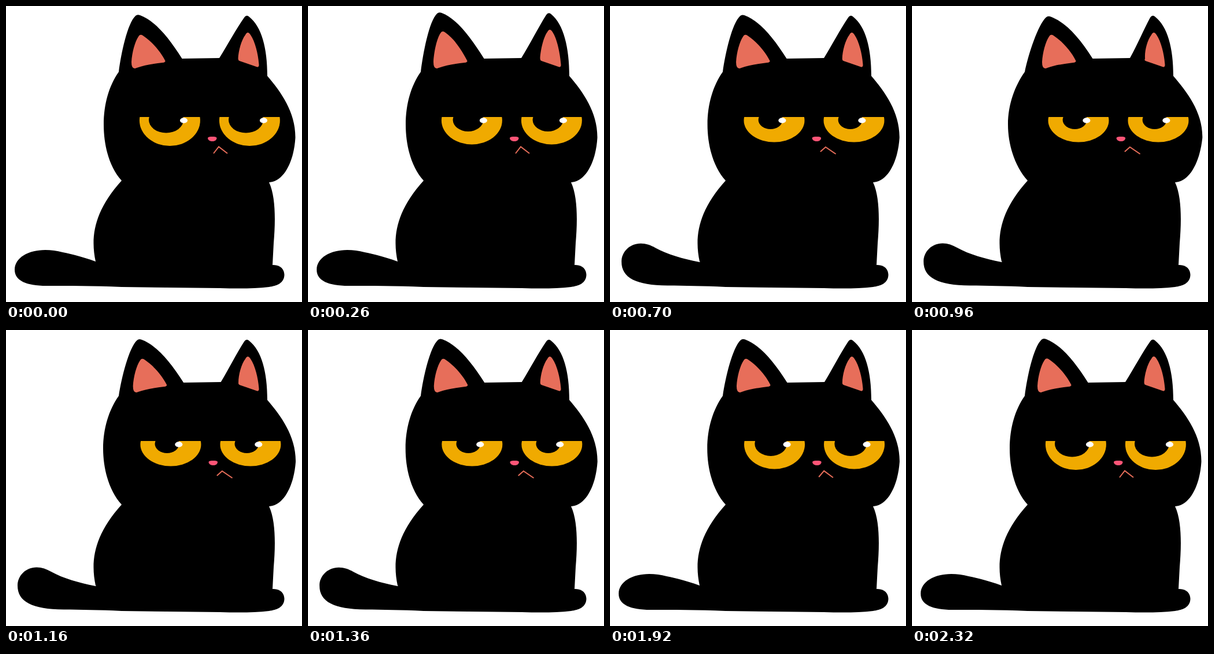
Recreate the animation shown at these times as an HTML page. Size 512 px wide and 512 px high, loop 2340 ms.

```html
<!DOCTYPE html>
<html>
<head>
<meta charset="utf-8">
<title>Grumpy cat</title>
<style>
html, body { margin: 0; width: 100%; height: 100%; overflow: hidden; background: #fff; }
svg { display: block; width: 100vw; height: 100vh; }
</style>
</head>
<body>
<svg viewBox="0 0 512 512">
  <clipPath id="lid"><rect y="192" width="512" height="100"/></clipPath>
  <path id="tail"/>
  <path id="cat"/>
  <path id="inner" fill="#e76e5a"/>
  <g id="face">
    <g clip-path="url(#lid)">
      <g id="eye">
        <ellipse id="iris" cx="283.4" cy="198" rx="52.5" fill="#f0aa00"/>
        <ellipse id="pupil" cx="277" cy="197"/>
        <ellipse id="glint" cy="198" rx="6.6" ry="4.7" fill="#fff"/>
      </g>
      <use href="#eye" x="138"/>
    </g>
    <path fill="#ff5577" d="M349 229C349 226 353 226 357 226S364.500 226 364.500 229C364 232 361 234 357 234S349.500 232 349 229Z"/>
    <path id="mouth" fill="none" stroke="#e76e5a" stroke-width="2"/>
  </g>
</svg>
<script>
const LOOP = 2340;
const $ = id => document.getElementById(id);
const set = (id, attrs) => { for (const k in attrs) $(id).setAttribute(k, attrs[k]); };
const mix = (a, b, k) => a + (b - a) * k;
const mixAll = (a, b, k) => a.map((v, i) => mix(v, b[i], k));

// Eased 0 to 1 between two times
const ease = (t, from, to) => {
  const k = Math.min(1, Math.max(0, (t - from) / (to - from)));
  return (1 - Math.cos(Math.PI * k)) / 2;
};
const hump = (t, from, to) => ease(t, from, (from + to) / 2) - ease(t, (from + to) / 2, to);

const tailDown = [155, 442, 130, 433, 115, 429.5, 98, 426, 88, 423.5, 78, 422, 68, 422,
  38, 422, 15, 436, 15, 456, 15, 475, 35, 484, 70, 484, 110, 484, 150, 484, 200, 486];
const tailUp = [155, 443, 125, 437, 100, 430, 78, 418, 70, 413.5, 62, 410.5, 53, 410.5,
  34, 410.5, 20, 425, 20, 442, 20, 470, 45, 483, 100, 483.5, 130, 484, 160, 484, 200, 486];
const mouthRest = [359, 255, 368, 243.5, 383, 255];
const mouthSkew = [363.3, 252, 372.3, 244, 390, 256];

function draw(t) {
  const lift = hump(t, 0, 340) + hump(t, 2000, 2340);
  const turn = ease(t, 620, 960) - ease(t, 960, 1290) + ease(t, 1290, 1640) - ease(t, 1690, 2035);
  const narrow = ease(t, 0, 600) - ease(t, 1640, 2060);
  const skew = ease(t, 300, 680) - ease(t, 1640, 2060);
  const wag = ease(t, 500, 720) - ease(t, 1340, 1560);

  const [x, y, ...curve] = mixAll(tailDown, tailUp, wag);
  set('tail', { d: `M${x} ${y}C${curve.join(' ')}L220 440Z` });

  const ex = 8 * turn - 1.5 * lift;   // left ear tip
  const ey = 2.5 * turn - 9 * lift;
  const nx = 8 * turn;                // ear notches
  const ry = -10 * lift;              // right ear tip
  const side = 3 * turn;
  set('cat', { d: `M195 114C${199 + nx / 3} 82 ${210 + ex} ${30 + ey} ${224 + ex} ${17 + ey}
    Q${227 + ex} ${14 + ey} ${232 + ex} ${16 + ey}
    C${258 + ex} ${26 + ey} ${281 + nx} 54 ${304.5 + nx} 91
    L${369 + nx} 90C${384 + nx * .8} 66 ${398 + nx * .4} ${40 + ry / 2} 412 ${20 + ry}
    Q416 ${14 + ry} 421 ${19 + ry}C442 ${36 + ry} 452 72 452 121
    C476 149 ${501 + side * .7} 184 ${500.5 + side * .6} 228C498 270 480 304 455 305
    C467 330 466 375 463 410L461 448C475 447 481.500 456 481.500 465
    C481 480 468 484 455 486C430 489 400 489 370 488L200 486L155 442
    C146 400 152 355 200 302
    C178 278 ${169 - side} 240 ${169 - side} 205C${169 - side} 170 178 138 195 114Z` });

  const top = -13 * lift, rtop = -11 * lift, l = v => v + nx;
  set('inner', { d: `M${l(217)} 97C${l(218)} ${80 + top / 3} ${l(223)} ${62 + top} ${l(229)} ${53 + top}
    Q${l(232)} ${47 + top} ${l(238)} ${52 + top}C${l(254)} ${63 + top} ${l(268)} 80 ${l(275)} 94
    Q${l(277)} 97 ${l(271)} 98C${l(255)} 100 ${l(240)} 102 ${l(226)} 107Q${l(217)} 111 ${l(217)} 97Z
    M${401.5 + nx / 5} 91C402 78 407 ${59 + rtop} 414 ${50 + rtop}Q418 ${42 + rtop} 423 ${50 + rtop}
    C431 ${62 + rtop} 436 82 437.500 101Q438 107 433 105L404 95Q401.500 94 ${401.5 + nx / 5} 91Z` });

  set('face', { transform: `translate(${4.6 * turn} 0)` });
  set('iris', { ry: mix(44, 37.5, narrow) });
  set('pupil', { rx: mix(30, 21, narrow), ry: mix(22.5, 16, narrow) });
  set('glint', { cx: mix(307.5, 297.3, narrow) });
  set('mouth', { d: 'M' + mixAll(mouthRest, mouthSkew, skew).join(' ') });
}

function tick() {
  draw(performance.now() % LOOP);
  requestAnimationFrame(tick);
}
tick();
</script>
</body>
</html>
```
